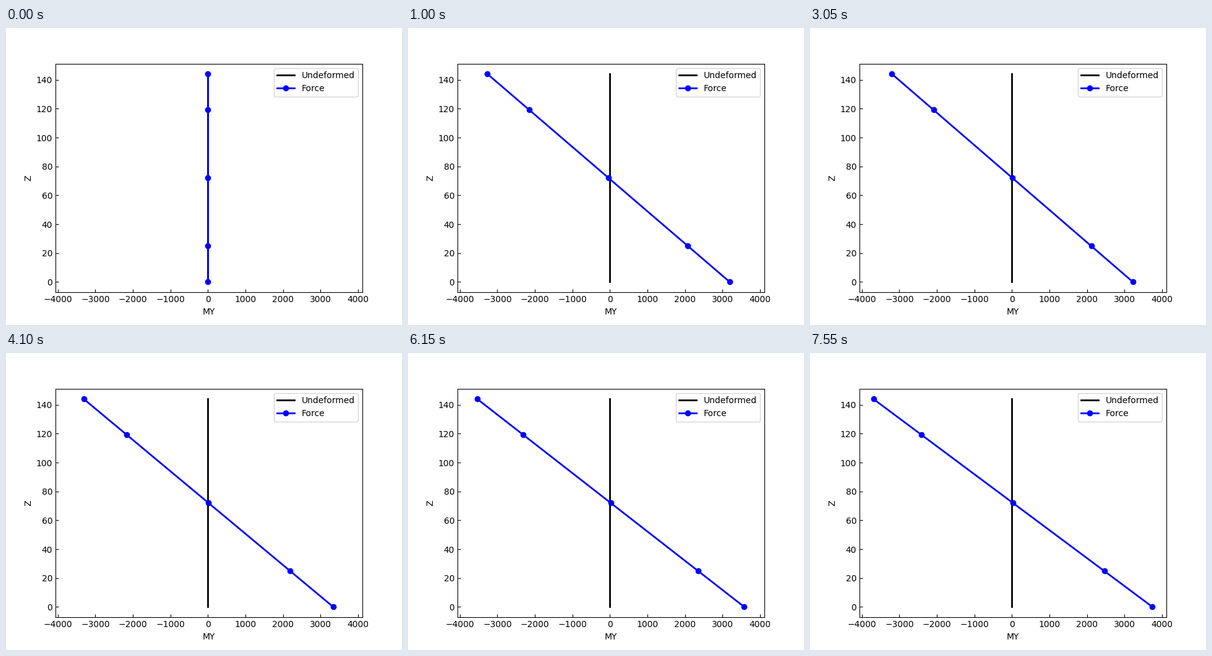
Recreate the animation shown at these times as a matplotlib script. Size 640 px wide and 480 px high, loop 7.6 s.

```python
import numpy as np
import matplotlib.pyplot as plt
from matplotlib.animation import FuncAnimation

FRAMES = 152
LAST = FRAMES - 1
STEP_MS = 50

HEIGHT = 144
NODES = np.array([0, 24.85, 72, 119.15, HEIGHT])

PEAK = 3380                 # moment at which either end yields
BASE_YIELD, TOP_YIELD = 16, 22
TOP_AT_BASE_YIELD = 3030    # top moment when the base gives way
KNEE = 64                   # step where hardening steepens
EARLY_RATE = 3.8            # hardening per step before the knee
BASE_KNEE, BASE_END = 3234, 3745
TOP_KNEE, TOP_END = 3208, 3690


def harden(step, knee, end):
    rate = EARLY_RATE if step < KNEE else (end - knee) / (LAST - KNEE)
    return knee + rate * (step - KNEE)


def after_yield(step, start, knee, end):
    """Drop from the peak and settle onto the hardening line."""
    excess = PEAK - harden(start, knee, end)
    decay = np.exp(-((step - start) / 4.1) ** 1.5)
    return harden(step, knee, end) + excess * decay


def base_moment(step):
    if step <= BASE_YIELD:
        return PEAK * step / BASE_YIELD
    return after_yield(step, BASE_YIELD, BASE_KNEE, BASE_END)


def top_moment(step):
    if step <= TOP_YIELD:
        return -np.interp(step, [0, BASE_YIELD, TOP_YIELD],
                          [0, TOP_AT_BASE_YIELD, PEAK])
    return -after_yield(step, TOP_YIELD, TOP_KNEE, TOP_END)


def moments(step):
    return np.interp(NODES, [0, HEIGHT], [base_moment(step), top_moment(step)])


fig, ax = plt.subplots(figsize=(6.4, 4.8), dpi=100)
ax.plot(np.zeros(len(NODES)), NODES, "k-", lw=2, label="Undeformed")
force, = ax.plot(moments(0), NODES, "bo-", lw=2, label="Force")

pad = 0.05 * (BASE_END + TOP_END)
ax.set_xlim(-TOP_END - pad, BASE_END + pad)
ax.set_ylim(-0.05 * HEIGHT, 1.05 * HEIGHT)
ax.set_xlabel("MY")
ax.set_ylabel("Z")
ax.tick_params(direction="in")
ax.legend(loc="upper right")


def update(step):
    force.set_xdata(moments(step))
    return force,


anim = FuncAnimation(fig, update, frames=FRAMES, interval=STEP_MS,
                     repeat=True, repeat_delay=0)
plt.show()
```
